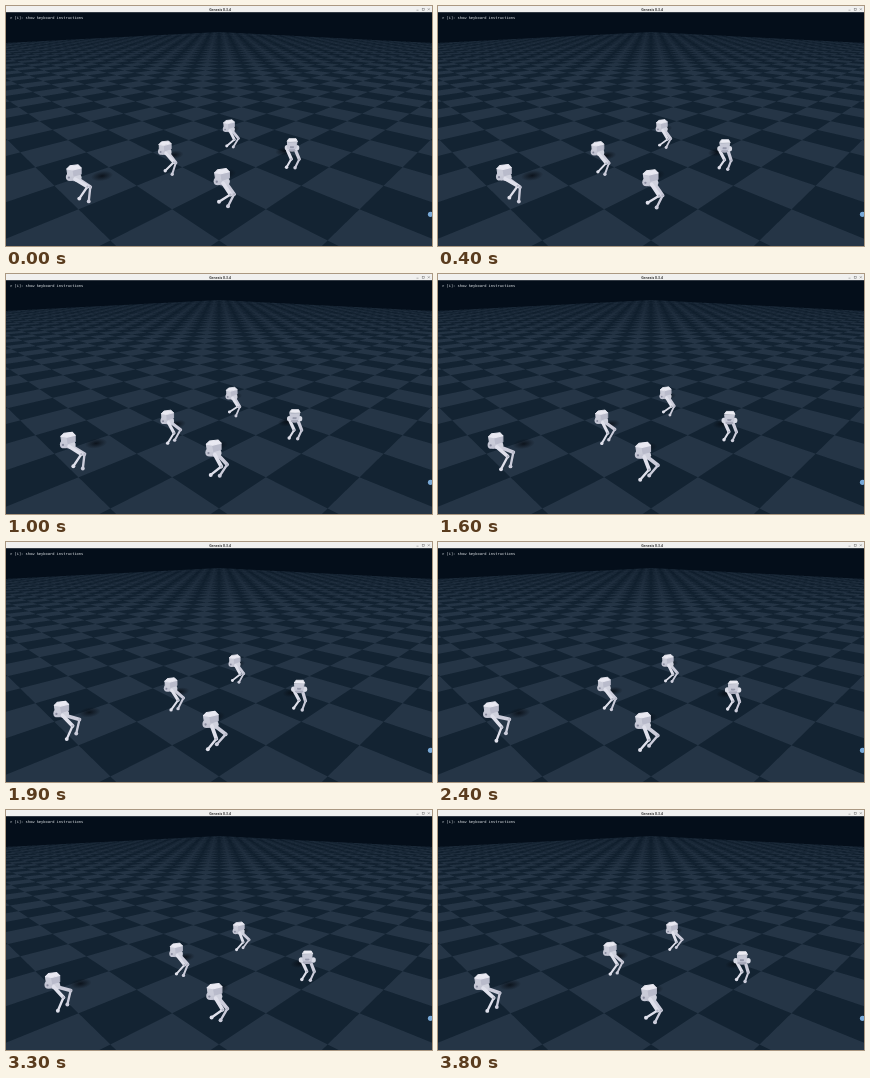
An HTML page with a canvas for the animation above (4000 ms loop, 426 by 240 pixels).

```html
<!DOCTYPE html>
<html lang="en">
<head>
<meta charset="utf-8">
<title>Walking bipeds</title>
<style>
  html, body { margin: 0; width: 100%; height: 100%; overflow: hidden; background: #040f1b; }
  canvas, svg { position: absolute; left: 0; top: 0; width: 426px; height: 240px; }
  .title { font: bold 3.4px "Open Sans", sans-serif; fill: #333; text-anchor: middle; }
  .hint { font: 3.7px "DejaVu Sans Mono", monospace; fill: #e2e6ea; }
</style>
</head>
<body>
<canvas id="stage"></canvas>
<svg viewBox="0 0 426 240">
  <rect width="426" height="6.2" fill="#f0f0ef"/>
  <g fill="none" stroke="#777" stroke-width=".5">
    <path d="M410.5 4.2h2M421.8 2.3l2 2m0-2l-2 2"/>
    <rect x="416.2" y="2.3" width="2" height="2"/>
  </g>
  <text class="title" x="214" y="4.5">Genesis 0.3.4</text>
  <text class="hint" x="4" y="13.3">&gt; [i]: show keyboard instructions</text>
  <circle cx="424.5" cy="208.3" r="2.6" fill="#78a9d8"/>
</svg>
<script>
const W = 426, H = 240, LOOP = 4000, TICK = 100;
const canvas = document.getElementById('stage');
const ctx = canvas.getContext('2d');
const dpr = window.devicePixelRatio || 1;
canvas.width = W * dpr;
canvas.height = H * dpr;

const clamp = (v, lo = 0, hi = 1) => Math.min(hi, Math.max(lo, v));
const mix = (a, b, k) => a + (b - a) * k;

// Checkered ground plane seen along its diagonal, ending in a far corner.
function makeFloor() {
  const HORIZON = 8.5, EDGE = 26, SUB = 4;
  const ACROSS = 2.08, DEPTH = 340 * ACROSS, SHIFT = -0.13;
  const FAR = DEPTH / (EDGE - HORIZON);
  const sky = [4, 14, 26], dark = [19, 35, 50], light = [37, 53, 70];
  const layer = document.createElement('canvas');
  layer.width = W;
  layer.height = H;
  const g = layer.getContext('2d');
  const img = g.createImageData(W, H);

  function sample(x, y) {
    const d = y - HORIZON;
    if (d <= 0) return sky;
    const across = (x - W / 2) * ACROSS / d, depth = DEPTH / d;
    if (Math.abs(across) + depth > FAR) return sky;
    const a = Math.floor(depth + SHIFT + across);
    const b = Math.floor(depth + SHIFT - across);
    return (a + b) & 1 ? light : dark;
  }

  for (let y = 0; y < H; y++) {
    const clear = mix(0.7, 1, clamp((y - EDGE) / 40));
    for (let x = 0; x < W; x++) {
      const sum = [0, 0, 0];
      for (let s = 0; s < SUB * SUB; s++) {
        const c = sample(x + (s % SUB + 0.5) / SUB, y + (Math.floor(s / SUB) + 0.5) / SUB);
        for (let k = 0; k < 3; k++) sum[k] += c[k] / (SUB * SUB);
      }
      const p = (y * W + x) * 4;
      for (let k = 0; k < 3; k++) img.data[p + k] = mix(sky[k], sum[k], clear);
      img.data[p + 3] = 255;
    }
  }
  g.putImageData(img, 0, 0);
  return layer;
}

// path: body at start, middle and end; foot: offset of the feet's midpoint;
// the feet stand `spread` apart and trade height by lean + lift * cos.
const robots = [
  { size: 0.78, limb: 10, path: [[223, 120], [228, 119], [234, 118]], foot: [1, 20.5], shadow: [2, 3],
    spread: 6.5, lean: 1, lift: 3, peak: 10, period: 40 },
  { size: 0.88, limb: 12, path: [[159, 142], [164, 143], [172, 139]], foot: [3.7, 24.5], shadow: [9, 7],
    spread: 7, lean: -0.5, lift: 4, peak: 0, period: 25 },
  { size: 0.9, limb: 9.5, front: true, path: [[286, 139], [292, 144], [304, 148]], foot: [-1.2, 22.5], shadow: [-7, 6],
    spread: 8.5, lean: 1, lift: 1, peak: 5, period: 14 },
  { size: 1.05, limb: 13.5, path: [[216, 171], [205, 177], [211, 183]], foot: [1.5, 27], shadow: [3, -3],
    spread: 9, lean: 0, lift: 5, peak: 2, period: 32 },
  { size: 1.02, limb: 14.5, path: [[68, 167], [57, 167], [44, 172]], foot: [10, 27], shadow: [28, 3],
    spread: 9.5, lean: -2, lift: 6, peak: 4, period: 40 }
];

// Ticks at which the picture stands still.
const pauses = [3, 20, 21, 28, 37, 38, 39];
const LAST = LOOP / TICK - 1 - pauses.length;
function stepAt(ms) {
  const tick = Math.floor(ms / TICK);
  return tick - pauses.filter(p => p <= tick).length;
}

// Curve through three points, reached at k = 0, 1/2 and 1.
function along([a, b, c], k) {
  return a.map((v, i) =>
    v * (1 - k) * (1 - 2 * k) + b[i] * 4 * k * (1 - k) + c[i] * k * (2 * k - 1));
}

function poly(color, ...pts) {
  ctx.fillStyle = ctx.strokeStyle = color;
  ctx.lineWidth = 1;
  ctx.beginPath();
  pts.forEach(([x, y]) => ctx.lineTo(x, y));
  ctx.closePath();
  ctx.fill();
  ctx.stroke();
}

function disc(color, x, y, rx, ry = rx) {
  ctx.fillStyle = color;
  ctx.beginPath();
  ctx.ellipse(x, y, rx, ry, 0, 0, 7);
  ctx.fill();
}

function line(color, width, a, b) {
  ctx.strokeStyle = color;
  ctx.lineWidth = width;
  ctx.beginPath();
  ctx.moveTo(...a);
  ctx.lineTo(...b);
  ctx.stroke();
}

// Two equal limbs, with the knee bent to the right.
function leg(hip, foot, limb, size, color) {
  const dx = foot[0] - hip[0], dy = foot[1] - hip[1];
  const d = Math.hypot(dx, dy);
  const bend = Math.sqrt(Math.max(0, limb * limb - d * d / 4)) / d;
  const knee = [hip[0] + dx / 2 + dy * bend, hip[1] + dy / 2 - dx * bend];
  line(color, 3.6 * size, hip, knee);
  line(color, 2.3 * size, knee, foot);
  disc('#b4b6c6', ...knee, 1.1 * size);
  disc(color, ...foot, 1.9 * size);
}

function sideBody() {
  disc('#a9abbc', 0, 3, 7, 5);
  disc('#d0d2de', 3, 4.5, 4.5, 4);
  disc('#c4c6d4', -4, 4, 4, 3.8);
  poly('#c9cbd8', [-7, -4], [-1, -3], [0, 3], [-6, 3]);
  poly('#b9bbcb', [-1, -3], [7, -5], [7, 1], [0, 3]);
  poly('#e9e9f2', [-7, -4], [-4, -7], [4, -8], [7, -5], [-1, -3]);
  disc('#888b9f', -5, 4.5, 1.1);
}

function frontBody(turn) {
  const w = mix(5.5, 7, turn);
  disc('#a9abbc', 0, 3, w, 4.5);
  disc('#d8dae5', -w, 3, 2.6, 3);
  disc('#d8dae5', w, 3, 2.6, 3);
  poly('#c6c8d6', [-5.5, -3], [5.5, -3], [4.5, 4], [-4.5, 4]);
  poly('#ececf4', [-5.5, -4], [-3.5, -7], [4.5, -7], [6, -4]);
  poly('#9497aa', [-2, 2], [2, 2], [1.5, 3], [-1.5, 3]);
}

function drawShadow(r, [x, y]) {
  const radius = 11 * r.size;
  ctx.save();
  ctx.translate(x + r.shadow[0], y + r.shadow[1]);
  ctx.rotate(-0.15);
  ctx.scale(1, 0.45);
  const fade = ctx.createRadialGradient(0, 0, 0, 0, 0, radius);
  fade.addColorStop(0, 'rgba(6,11,18,.8)');
  fade.addColorStop(1, 'rgba(6,11,18,0)');
  disc(fade, 0, 0, radius);
  ctx.restore();
}

function drawRobot(r, [x, y], step) {
  const s = r.size;
  const rise = r.lean + r.lift * Math.cos(2 * Math.PI * (step - r.peak) / r.period);
  const hips = r.front ? [-5, 4] : [1, 4];
  const legAt = (side, color) => leg(
    [x + hips[side] * s, y + 6 * s],
    [x + r.foot[0] + (side - 0.5) * r.spread, y + r.foot[1] + (side - 0.5) * rise],
    r.limb, s, color);

  legAt(1, '#cccddb');
  if (r.front) legAt(0, '#dedfea');
  ctx.save();
  ctx.translate(x, y);
  ctx.scale(s, s);
  if (r.front) frontBody(step / LAST);
  else sideBody();
  ctx.restore();
  if (!r.front) legAt(0, '#dfe0eb');
}

const floor = makeFloor();
ctx.lineCap = ctx.lineJoin = 'round';

function draw(ms) {
  const step = stepAt(ms % LOOP);
  ctx.setTransform(dpr, 0, 0, dpr, 0, 0);
  ctx.drawImage(floor, 0, 0, W, H);
  const places = robots.map(r => along(r.path, step / LAST));
  robots.forEach((r, i) => drawShadow(r, places[i]));
  robots.forEach((r, i) => drawRobot(r, places[i], step));
}

const start = performance.now();
function tick() {
  draw(performance.now() - start);
  requestAnimationFrame(tick);
}
tick();
</script>
</body>
</html>
```
